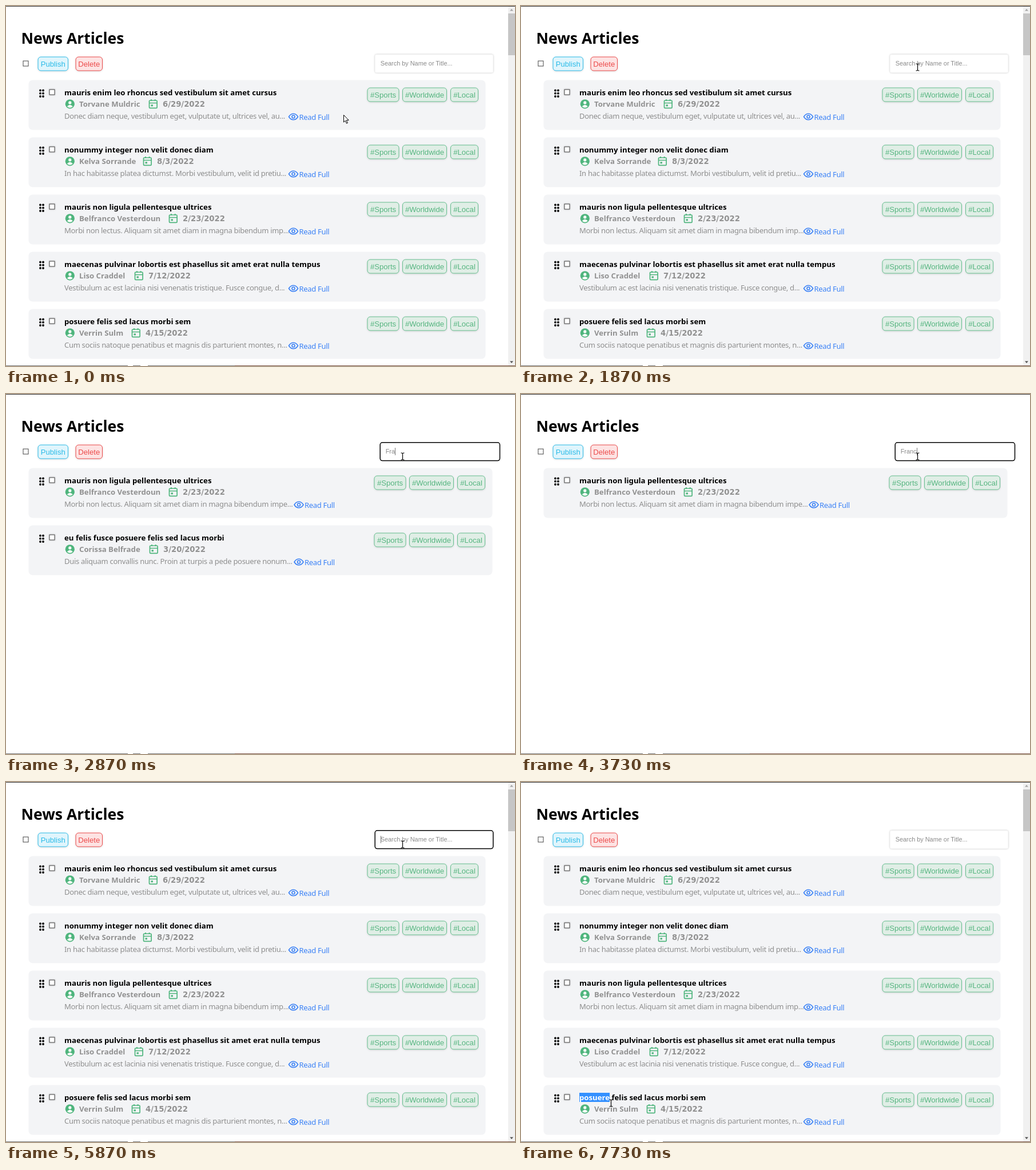
An HTML page for the animation above (8 s loop, 890 by 629 pixels).

```html
<!DOCTYPE html>
<html lang="en">
<head>
<meta charset="utf-8">
<title>News Articles</title>
<style>
  html, body { margin: 0; width: 100%; height: 100%; overflow: hidden; background: #fff; }
  svg { display: block; width: 890px; height: 629px; }
  text { white-space: pre; font-family: "Noto Sans", sans-serif; }
  .heading { font-size: 26.5px; font-weight: 700; }
  .title { font-size: 13.2px; font-weight: 700; }
  .name { font-size: 13.2px; font-weight: 700; fill: #919191; }
  .date { font: 700 13.2px "DejaVu Sans", sans-serif; fill: #919191; }
  .body, .link { font-size: 13px; letter-spacing: -.3px; fill: #8e8e8e; }
  .link { fill: #3b82f6; }
  .chip { font: 13.1px "Liberation Sans", sans-serif; }
  .field { font: 10.9px "Liberation Sans", sans-serif; fill: #8a8a8a; }
  .shadow { filter: drop-shadow(0 1px 1.5px #0002); }
  .raised { filter: drop-shadow(0 .5px 1.5px #0004); }
</style>
</head>
<body>
<svg viewBox="0 0 890 629">
  <defs>
    <g id="handle">
      <g id="dots"><circle cx="60" cy="147.5" r="1.9"/><circle cx="60" cy="152.7" r="1.9"/><circle cx="60" cy="158" r="1.9"/></g>
      <use href="#dots" x="5"/>
    </g>
    <rect id="box" width="9" height="9" fill="#fff" stroke="#444"/>
    <g id="user">
      <circle r="8.1" fill="#4fb57d"/>
      <circle cy="-2.4" r="2.6" fill="#fff"/>
      <path d="M-5 4.2Q0-1.2 5 4.2Q0 8.6-5 4.2" fill="#fff"/>
    </g>
    <g id="calendar" fill="none" stroke="#4fb57d" stroke-width="1.7">
      <rect x="1" y="2" width="13.6" height="13.4" rx="1.5"/>
      <path d="M1 6.5H14.6M4.5 0V3M11.1 0V3"/>
      <path d="M4 10.8H7.4" stroke-width="3"/>
    </g>
    <g id="eye" fill="none" stroke="#3b82f6" stroke-width="1.6">
      <path d="M-8 0C-4-7 4-7 8 0C4 7-4 7-8 0Z"/><circle r="2.5"/>
    </g>
  </defs>
  <g id="page"></g>
  <path id="arrow" d="M.5.5V13L3.4 10.3L5.4 15.2L7.4 14.3L5.3 9.5H9.2Z" fill="#fff" stroke="#000"/>
  <path id="beam" d="M-2.5-6H-1L.5-5L2-6H3.5M.5-5V5M-2.5 6H-1L.5 5L2 6H3.5" fill="none" stroke="#000" stroke-width="1.2"/>
</svg>
<script>
const LOOP = 8000;

// title, author, x of the date, date, summary ("|" marks the part shown only in the wide layout)
const articles = [
  ["mauris enim leo rhoncus sed vestibulum sit amet cursus", "Torvane Muldric", 274, "6/29/2022",
    "Donec diam neque, vestibulum eget, vulputate ut, ultrices vel, au"],
  ["nonummy integer non velit donec diam", "Kelva Sorrande", 264, "8/3/2022",
    "In hac habitasse platea dictumst. Morbi vestibulum, velit id pretiu"],
  ["mauris non ligula pellentesque ultrices", "Belfranco Vesterdoun", 309, "2/23/2022",
    "Morbi non lectus. Aliquam sit amet diam in magna bibendum imp|e"],
  ["maecenas pulvinar lobortis est phasellus sit amet erat nulla tempus", "Liso Craddel", 249, "7/12/2022",
    "Vestibulum ac est lacinia nisi venenatis tristique. Fusce congue, d"],
  ["posuere felis sed lacus morbi sem", "Verrin Sulm", 244, "4/15/2022",
    "Cum sociis natoque penatibus et magnis dis parturient montes, n"],
  ["in faucibus orci luctus et ultrices posuere cubilia curae", "Manfrid Tollows", 275, "11/3/2022",
    "Maecenas leo odio, condimentum id, luctus nec, molestie sed, ju|st"],
  ["nunc rhoncus dui vel sem sed sagittis", "Rufo Mellingast", 275, "9/30/2022",
    "Morbi non lectus. Aliquam sit amet diam in magna bibendum imp|e"],
  ["mus etiam vel augue vestibulum", "Jem Alfwick", 243, "3/9/2022",
    "Maecenas tristique, est et tempus semper, est quam pharetra ma"],
  ["eu felis fusce posuere felis sed lacus morbi", "Corissa Belfrade", 275, "3/20/2022",
    "Duis aliquam convallis nunc. Proin at turpis a pede posuere nonu|m"],
];

const typing = [[0, ""], [2130, "F"], [2670, "Fr"], [2870, "Fra"], [3270, "Fran"], [3730, "Franc"],
  [4670, "Fran"], [4740, "Fra"], [4870, "Fr"], [5000, "F"], [5200, ""]];
const filtering = typing.map(([t, q]) => [t === 2130 ? 2470 : t, q]);
const caretBlink = [[0, 0], [1930, 1], [4270, 0], [4670, 1], [5330, 0], [5870, 1], [6400, 0], [6930, 1], [7330, 0]];
const pointer = [[0, 590, 190], [200, 590, 190], [750, 103, 377], [1000, 138, 372], [1070, 138, 372],
  [1870, 693, 107], [2130, 693, 109], [5870, 693, 109], [6670, 107, 532], [6800, 94, 547],
  [6930, 102, 543], [7069, 102, 543], [7070, 106, 552], [7330, 106, 552], [7730, 157, 561], [LOOP, 157, 561]];

const page = document.getElementById("page");
const arrow = document.getElementById("arrow");
const beam = document.getElementById("beam");

const valueAt = (steps, t) => steps.findLast(([start]) => start <= t)[1];
const text = (cls, x, y, str, extra = "") => `<text class="${cls}" x="${x}" y="${y}" ${extra}>${str}</text>`;
const rect = (x, y, w, h, fill, extra = "") =>
  `<rect x="${x}" y="${y}" width="${w}" height="${h}" fill="${fill}" ${extra}/>`;
const use = (id, x, y, extra = "") => `<use href="#${id}" x="${x}" y="${y}" ${extra}/>`;

function chip(x, y, w, label, color, border, fill) {
  return rect(x, y, w, 24, fill, `rx="5" stroke="${border}" class="shadow"`) +
    text("chip", x + w / 2, y + 17, label, `fill="${color}" text-anchor="middle"`);
}

function card([title, name, dateX, date, summary], row, wide) {
  const tagX = wide ? 12 : 0, linkX = wide ? 9.5 : 0;
  const [start, more = ""] = summary.split("|");
  const tag = (x, w, label) => chip(x + tagX, 143, w, label, "#56b580", "#66bf8f", "#e0eee6");
  return `<g transform="translate(0 ${row * 100})">` +
    rect(39.5, 129.5, wide ? 811 : 799, 87, "#f3f4f6", 'rx="7"') +
    use("handle", 0, 0) + use("box", 76, 146, 'class="raised"') +
    text("title", 102, 156, title) +
    use("user", 111.8, 171.3) + text("name", 128, 176, name) +
    use("calendar", dateX - 24.5, 163) + text("date", dateX, 176, date) +
    text("body", 102, 197, start + (wide ? more : "") + "...") +
    use("eye", 502.5 + linkX, 193.5) + text("link", 512.5 + linkX, 199, "Read Full") +
    tag(632, 55, "#Sports") + tag(693.5, 77, "#Worldwide") + tag(777.5, 48, "#Local") + "</g>";
}

function searchField(query, focused, wide) {
  const x = wide ? 654 : 645;
  const frame = focused ? 'rx="4" stroke="#000" stroke-width="1.5"' : 'rx="3" class="raised"';
  return rect(x + .2, 84.8, wide ? 209.3 : 206.6, 31.8, "#fff", frame) +
    text("field", x + 9.7, 104, query || "Search by Name or Title...", 'id="query"');
}

function scrollbar(thumb) {
  return rect(878, 1, 12, 627, "#f1f1f1") + rect(878, 13, 12, thumb, "#c6c6c6") +
    '<path d="M881 8.5L884 5L887 8.5Z" fill="#a3a3a3"/><path d="M881 620.5L884 624L887 620.5Z" fill="#505050"/>';
}

function render({ query, filter, focused, caret, selected }) {
  const matches = articles.filter(a => a[1].toLowerCase().includes(filter.toLowerCase()));
  const wide = matches.length < 5;
  page.innerHTML = rect(0, 0, 890, 629, "#fff") +
    text("heading", 26.5, 66, "News Articles") +
    use("box", 30, 96) +
    chip(56, 89, 52.5, "Publish", "#2bbbe8", "#2bbbe8", "#e0f5fc") +
    chip(122, 89, 46.5, "Delete", "#ec4a4a", "#ec4a4a", "#fde3e3") +
    searchField(query, focused, wide) +
    matches.slice(0, 5).map((a, i) => card(a, i, wide)).join("") +
    (wide ? "" : scrollbar(filter ? 579 : 73)) +
    rect(0, 0, 890, 1, "#333") +
    rect(0, 628, 400, 1, "#777") + rect(213, 628, 9, 1, "#fff") + rect(235, 628, 13, 1, "#fff") +
    rect(400, 628, 490, 1, "#80594b");

  if (caret) {
    const label = document.getElementById("query");
    const x = (wide ? 663.7 : 654.7) + (query ? label.getComputedTextLength() : 0);
    page.insertAdjacentHTML("beforeend", rect(Math.round(x), 94, 1, 13, "#777"));
  }
  if (selected) {
    const title = page.querySelectorAll(".title")[4];
    const width = title.getSubStringLength(0, selected);
    const str = title.textContent;
    title.insertAdjacentHTML("beforebegin", rect(102, 143, width, 16, "#3390ff"));
    title.innerHTML = `<tspan fill="#fff">${str.slice(0, selected)}</tspan>${str.slice(selected)}`;
  }
}

function pointerAt(t) {
  const i = pointer.findLastIndex(p => p[0] <= t);
  const [t0, x0, y0] = pointer[i], [t1, x1, y1] = pointer[i + 1];
  const u = (t - t0) / (t1 - t0), k = u * u * (3 - 2 * u);
  return [x0 + (x1 - x0) * k, y0 + (y1 - y0) * k];
}

function overText(x, y) {
  const line = (y - 130) % 100;
  return (x > 645 && y > 85 && y < 117) || (x > 104 && x < 490 && line > 15 && line < 70);
}

let lastKey;
function frame(now) {
  const t = now % LOOP;
  const [x, y] = pointerAt(t);
  const state = {
    query: valueAt(typing, t),
    filter: valueAt(filtering, t),
    focused: t >= 1930 && t < 7330,
    caret: valueAt(caretBlink, t),
    selected: t < 7330 ? 0 : Math.min(7, Math.round((x - 102) / 7.5)),
  };
  const key = JSON.stringify(state);
  if (key !== lastKey) render(state);
  lastKey = key;

  const isText = overText(x, y);
  const place = `translate(${Math.round(x)} ${Math.round(y)})`;
  arrow.setAttribute("transform", place);
  beam.setAttribute("transform", place);
  arrow.style.display = isText ? "none" : "";
  beam.style.display = isText ? "" : "none";
  requestAnimationFrame(frame);
}
requestAnimationFrame(frame);
</script>
</body>
</html>
```
